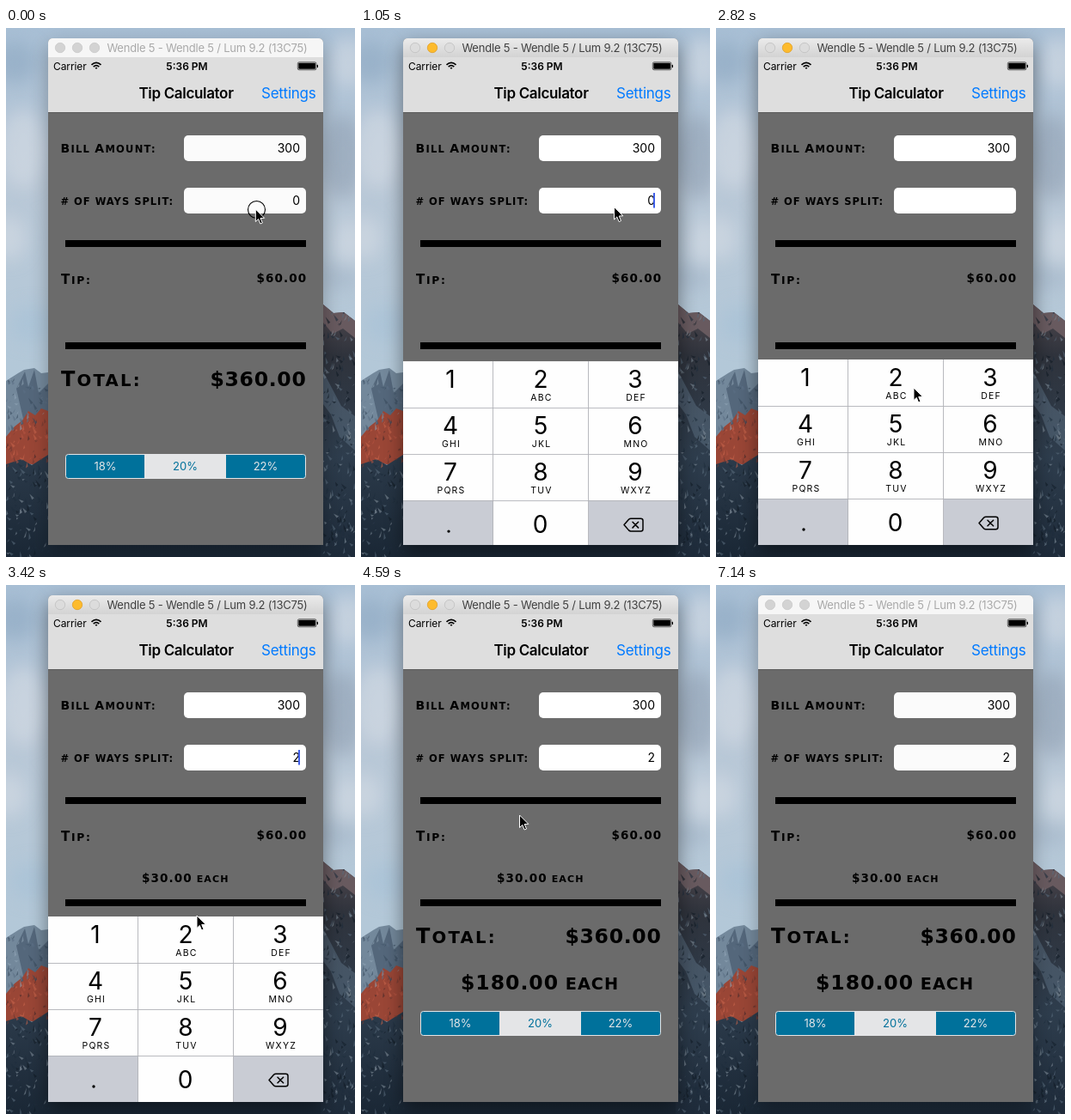
Animation of 406 by 616 pixels, one loop 7240 ms. Source, as an HTML page:

```html
<!DOCTYPE html>
<html lang="en">
<head>
<meta charset="utf-8">
<title>Tip Calculator</title>
<style>
  html, body { margin: 0; width: 100%; height: 100%; overflow: hidden; background: #a9c0d4; }
  svg { display: block; width: 100%; height: 100%; }
  text { font-family: Inter, Roboto, sans-serif; }
  .plate { font-family: "DejaVu Sans", Inter, sans-serif; font-weight: 700; }
  .mid { text-anchor: middle; }
  .end { text-anchor: end; }
</style>
</head>
<body>
<svg viewBox="0 0 406 616" preserveAspectRatio="none">
  <defs>
    <linearGradient id="sky" x2="0" y2="1">
      <stop offset="0" stop-color="#a8bfd5"/>
      <stop offset=".3" stop-color="#b9c8d7"/>
      <stop offset=".65" stop-color="#b3c8d8"/>
    </linearGradient>
    <linearGradient id="bar" x2="0" y2="1">
      <stop offset="0" stop-color="#ebebeb"/>
      <stop offset="1" stop-color="#d3d3d3"/>
    </linearGradient>
    <linearGradient id="ridge" x2="0" y2="1">
      <stop offset="0" stop-color="#51494f"/>
      <stop offset=".2" stop-color="#2f333c"/>
      <stop offset=".6" stop-color="#2e3d4d"/>
      <stop offset="1" stop-color="#1e2b3a"/>
    </linearGradient>
    <linearGradient id="foot" x2="0" y2="1">
      <stop offset="0" stop-color="#2c3b4b"/>
      <stop offset="1" stop-color="#1a2735"/>
    </linearGradient>
    <filter id="soft" x="-100%" y="-100%" width="300%" height="300%"><feGaussianBlur stdDeviation="10"/></filter>
    <filter id="fine"><feGaussianBlur stdDeviation=".7"/></filter>
    <filter id="shade" x="-20%" y="-20%" width="140%" height="140%"><feGaussianBlur stdDeviation="11"/></filter>
    <clipPath id="land"><path d="M0 411L14 402 21 398 33 396 41 402 49 401V602H369V322L381 332 393 331 406 341V616H0Z"/></clipPath>
    <clipPath id="window"><rect x="49" y="12" width="320" height="590"/></clipPath>
  </defs>

  <rect width="406" height="616" fill="url(#sky)"/>
  <g id="clouds" filter="url(#soft)"></g>
  <g filter="url(#fine)">
    <path d="M0 411L14 402 21 398 33 396 41 402 49 401V520H0Z" fill="#73889b"/>
    <path d="M12 420L22 400 26 418 33 398 38 425 49 414V465L20 455Z" fill="#54677b"/>
    <path d="M0 476L10 464 19 457 26 446 34 451 41 443 49 446V512L20 506 0 512Z" fill="#9a4636"/>
    <path d="M0 508L18 502 30 509 49 497V602H369V616H0Z" fill="url(#foot)"/>
    <path d="M369 322L381 332 393 331 406 341V616H366Z" fill="url(#ridge)"/>
    <path d="M369 322L381 332 393 331 406 341V361L392 350 380 356 369 343Z" fill="#685a5f"/>
    <path d="M369 400L380 421 390 440 406 452V492L388 476 378 450 369 438Z" fill="#56687a" opacity=".6"/>
  </g>
  <g id="rocks" clip-path="url(#land)"></g>

  <rect id="shadow" x="49" y="20" width="320" height="590" rx="5" filter="url(#shade)"/>

  <path d="M49 602V17a5 5 0 0 1 5-5H364a5 5 0 0 1 5 5V602Z" fill="#6b6b6b"/>
  <path id="titlebar" d="M49 34V17a5 5 0 0 1 5-5H364a5 5 0 0 1 5 5V34Z"/>
  <g id="dots"></g>
  <text id="title" class="mid" x="234" y="28" font-size="13" letter-spacing="-.2">Wendle 5 - Wendle 5 / Lum 9.2 (13C75)</text>

  <rect x="49" y="34" width="320" height="64" fill="#dedede"/>
  <rect x="49" y="98" width="320" height="1" fill="#5a5a5a"/>
  <text x="55" y="48.500" font-size="12" letter-spacing="-.1">Carrier</text>
  <g fill="none" stroke="#000" stroke-width="1.7">
    <path d="M99.500 42.800Q105 37.800 110.500 42.800M101.700 45.100Q105 42 108.300 45.100"/>
    <path d="M103.500 46.300Q105 45 106.500 46.300L105 48Z" fill="#000" stroke="none"/>
  </g>
  <text class="mid" x="210.500" y="48.500" font-size="12" font-weight="600">5:36 PM</text>
  <rect x="339.300" y="39.800" width="21.700" height="9" rx="1.800" fill="none" stroke="#000" stroke-width=".6"/>
  <rect x="340.300" y="40.800" width="19.700" height="7" rx=".8"/>
  <rect x="361.700" y="42.700" width="1.300" height="3.300" rx=".6"/>
  <text class="mid" x="209.500" y="82" font-size="17" font-weight="600" letter-spacing="-.33">Tip Calculator</text>
  <text class="end" x="360.500" y="82" font-size="17" letter-spacing="-.25" fill="#007aff">Settings</text>

  <g id="fields">
    <rect x="207" y="125" width="142" height="30" rx="5"/>
    <rect x="207" y="186" width="142" height="30" rx="5"/>
  </g>
  <text class="end" x="342" y="145" font-size="14">300</text>
  <text id="split" class="end" x="342" y="206" font-size="14"></text>
  <rect id="caret" x="340" y="192" width="2" height="17.500" fill="#3f5fe8"/>
  <rect x="69" y="247" width="280" height="8"/>
  <rect x="69" y="366" width="280" height="8"/>
  <g id="labels"></g>
  <g id="each"></g>

  <rect x="69.500" y="496.500" width="279" height="28" rx="3" fill="#00719b" stroke="#e4e5e7"/>
  <rect x="161" y="496" width="95" height="29" fill="#e4e5e7"/>
  <g class="mid" font-size="13" fill="#e4e5e7">
    <text x="115.500" y="515">18%</text>
    <text x="208.500" y="515" fill="#00719b">20%</text>
    <text x="302" y="515">22%</text>
  </g>

  <g clip-path="url(#window)"><g id="keyboard"></g></g>
  <g id="pointer">
    <circle id="touch" cx="1.200" cy=".5" r="10" fill="none" stroke="#000" stroke-width="1.100"/>
    <path d="M0 0V14.500L3.300 11.400 5.600 17 8 16 5.700 10.500 10.300 10.300Z" stroke="#fff" stroke-width="1"/>
  </g>
</svg>

<script>
const $ = id => document.getElementById(id);
const LOOP = 7240;
const REST = 386, BOTTOM = 602, ROW = 54;

const TICKS = [0, 150, 300, 600, 750, 900, 1050, 1200, 1350, 1500, 1640,
  1790, 1940, 2090, 2240, 2390, 2530, 2670, 2820, 2970, 3120, 3420, 3570,
  3710, 3860, 4000, 4150, 4300, 4440, 4590, 6240, 6390, 7140];

// Pointer tip: time, x, y
const PATH = [[0, 290.3, 211], [150, 294.5, 208.5], [1050, 294.5, 208.5],
  [1350, 315, 320], [1640, 352, 520], [1790, 375, 578], [1940, 340, 580],
  [2090, 321, 577], [2240, 321, 577], [2530, 270, 500], [2820, 230, 419],
  [3120, 230, 419], [3420, 222, 385], [3860, 184.5, 268], [4590, 184.5, 268],
  [6240, 199, 281]];

const within = (t, ...spans) => spans.some(([a, b]) => t >= a && t < b);
const show = (id, on) => $(id).setAttribute("visibility", on ? "visible" : "hidden");

function random(seed) {
  return () => (seed = seed * 16807 % 2147483647) / 2147483647;
}

// Engraved style: lower case becomes small capitals
function plate(x, y, size, gap, text) {
  const body = text.replace(/[a-z#: ]+/g, s => `<tspan font-size=".82em">${s.toUpperCase()}</tspan>`);
  return `<text class="plate" x="${x}" y="${y}" font-size="${size}" letter-spacing="${gap}">${body}</text>`;
}

function buildScenery() {
  const puff = (x, y, rx, ry, fill) =>
    `<ellipse cx="${x}" cy="${y}" rx="${rx}" ry="${ry}" fill="${fill}" opacity=".6"/>`;
  const light = "#d5dce4", deep = "#8ea8c2";
  $("clouds").innerHTML = puff(10, 40, 26, 24, deep) + puff(20, 140, 28, 46, light) +
    puff(4, 245, 20, 26, light) + puff(30, 345, 26, 22, "#a7c2d7") +
    puff(398, 40, 22, 30, light) + puff(392, 150, 24, 50, "#8f9fb3") +
    puff(400, 250, 20, 26, light) + puff(385, 290, 24, 16, "#a3b5c6");

  const rnd = random(41);
  const tones = ["#121b26", "#57697b", "#1f2d3c", "#7d8a97"];
  const warm = ["#43282a", "#c9644c", "#6d3a33", "#b55442"];
  const cool = ["#465a6e", "#92a5b6", "#5c7085", "#394b5e"];
  let rocks = "";
  for (let i = 0; i < 420; i++) {
    const right = i % 2, x = right ? 368 + rnd() * 38 : rnd() * 49;
    const y = right ? 325 + rnd() * 290 : 400 + rnd() * 215;
    const set = right || y > 507 ? tones : y > 468 - x * .45 ? warm : cool;
    const dx = (rnd() - .5) * 8, dy = 2 + rnd() * 7;
    rocks += `<path d="M${x} ${y}l${dx} ${dy}l2.5 -2Z" fill="${set[Math.floor(rnd() * 4)]}" opacity=".6"/>`;
  }
  $("rocks").innerHTML = rocks;
}

function buildLabels() {
  $("labels").innerHTML =
    plate(63.5, 145, 14, 1.25, "Bill Amount:") +
    plate(63.5, 206, 14, 1, "# of ways split:") +
    plate(64, 297.5, 15, 1.7, "Tip:") +
    plate(291.5, 296, 13.5, 1.1, "$60.00") +
    plate(64, 417, 24, 2.2, "Total:") +
    plate(237.5, 417, 23.5, .7, "$360.00");
  $("each").innerHTML =
    plate(158, 346, 13.5, 1.1, "$30.00 each") +
    plate(116, 471, 23.5, 1, "$180.00 each");
  $("dots").innerHTML = [63, 83, 103].map(x =>
    `<circle cx="${x}" cy="23" r="5.7" stroke-width=".8"/>`).join("");
}

function buildKeyboard() {
  const lefts = [49, 154, 265, 369], mids = [104, 209, 319];
  const letters = ["", "ABC", "DEF", "GHI", "JKL", "MNO", "PQRS", "TUV", "WXYZ"];
  const box = (col, row, fill, id) =>
    `<rect ${id ? `id="${id}"` : ""} x="${lefts[col]}" y="${row * ROW}" width="${lefts[col + 1] - lefts[col]}" height="${ROW}" fill="${fill}"/>`;
  let out = `<rect x="49" width="320" height="216" fill="#fefefe"/>` +
    box(0, 3, "#c9ccd4") + box(2, 3, "#c9ccd4", "erase") + box(1, 0, "#c9ccd4", "two");
  letters.forEach((word, i) => {
    const x = mids[i % 3], y = Math.floor(i / 3) * ROW;
    out += `<text class="mid" x="${x}" y="${y + 30.5}" font-size="28">${i + 1}</text>
      <text class="mid" x="${x + 1}" y="${y + 45.5}" font-size="10.5" letter-spacing="1.2">${word}</text>`;
  });
  out += `<text class="mid" x="208.5" y="200" font-size="28">0</text>
    <circle cx="102" cy="198" r="1.7"/>
    <path d="M153.500 0V216M264.500 0V216M49 54.500H369M49 108.500H369M49 162.500H369" stroke="#b2b3b8" stroke-width=".9"/>
    <path transform="translate(317 190.500)" fill="none" stroke="#000" stroke-width="1.5" stroke-linecap="round" stroke-linejoin="round"
      d="M-11 0L-5.500 -6.300Q-4.500 -7.300 -3 -7.300H8.500Q11 -7.300 11 -4.800V4.800Q11 7.300 8.500 7.300H-3Q-4.500 7.300 -5.500 6.300ZM-1 -3.300L5.600 3.300M5.600 -3.300L-1 3.300"/>`;
  $("keyboard").innerHTML = out;
}

// Critically damped spring from 0 to 1
function spring(ms, rate) {
  const x = Math.max(0, ms) * rate;
  return 1 - (1 + x) * Math.exp(-x);
}

function keyboardTop(t) {
  if (t >= 4590) return BOTTOM;
  const up = spring(t - 666, .0174) - spring(t - 4127, .0186);
  return BOTTOM - (BOTTOM - REST) * up;
}

function pointerAt(t) {
  const i = PATH.findIndex(p => p[0] > t);
  if (i < 0) return PATH[PATH.length - 1].slice(1);
  const [t0, x0, y0] = PATH[i - 1], [t1, x1, y1] = PATH[i];
  const k = (t - t0) / (t1 - t0);
  return [x0 + (x1 - x0) * k, y0 + (y1 - y0) * k];
}

function draw(time) {
  const t = TICKS.filter(v => v <= time).pop();
  const active = within(t, [600, 7140]);

  $("titlebar").setAttribute("fill", active ? "url(#bar)" : "#f6f6f6");
  $("title").setAttribute("fill", active ? "#404040" : "#a9a9a9");
  $("fields").setAttribute("fill", active ? "#fff" : "#fbfbfb");
  $("shadow").setAttribute("opacity", active ? .45 : .28);
  [...$("dots").children].forEach((dot, i) => {
    const lit = active && i === 1;
    dot.setAttribute("fill", lit ? "#fdbb2d" : active ? "#dcdcdc" : "#d3d3d3");
    dot.setAttribute("stroke", lit ? "#e0a02a" : active ? "#c0c0c0" : "#cacaca");
  });

  $("split").textContent = t < 2240 ? "0" : t < 3120 ? "" : "2";
  show("each", t >= 3120);
  show("caret", within(t, [600, 1350], [1790, 2670], [3120, 3570]));
  show("two", within(t, [2970, 3120]));
  $("erase").setAttribute("fill", within(t, [2090, 2240]) ? "#fefefe" : "#c9ccd4");
  $("keyboard").setAttribute("transform", `translate(0 ${keyboardTop(t).toFixed(2)})`);

  const [x, y] = pointerAt(t);
  $("pointer").setAttribute("transform", `translate(${x.toFixed(1)} ${y.toFixed(1)})`);
  $("pointer").setAttribute("display", t < 6390 ? "inline" : "none");
  show("touch", within(t, [0, 300], [2090, 2240], [2970, 3120], [4000, 4150]));
}

buildScenery();
buildLabels();
buildKeyboard();

const start = performance.now();
function frame() {
  draw((performance.now() - start) % LOOP);
  requestAnimationFrame(frame);
}
frame();
</script>
</body>
</html>
```
